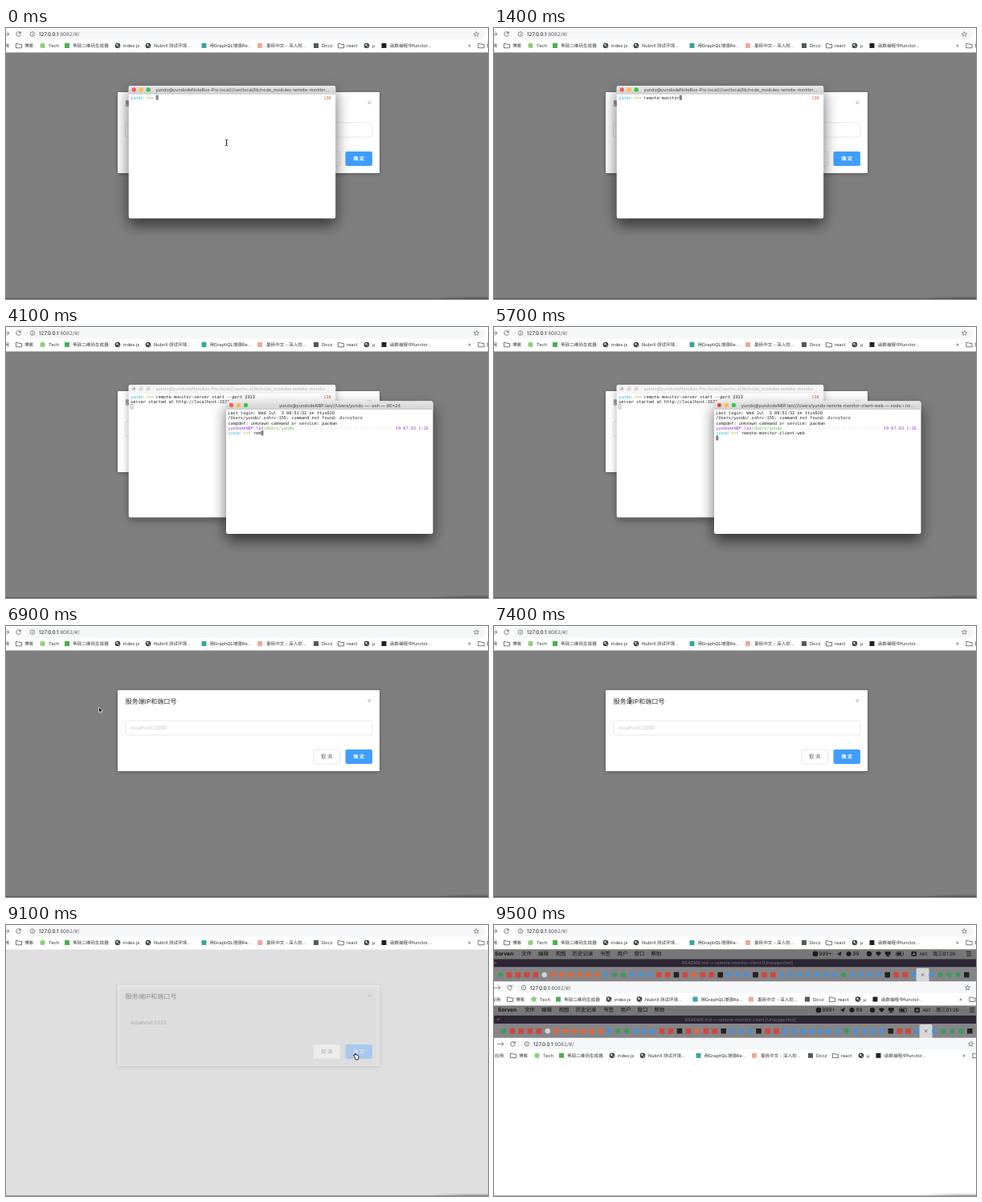
These frames come from a looping animation (600 px wide and 338 px high, 9600 ms). An HTML page with a canvas:

```html
<!DOCTYPE html>
<html lang="zh-CN">
<head>
<meta charset="utf-8">
<title>Remote monitor demo</title>
<style>
html, body { margin: 0; width: 100%; height: 100%; overflow: hidden; background: #fff; }
canvas { display: block; width: 600px; height: 338px; }
</style>
</head>
<body>
<canvas id="stage" width="600" height="338"></canvas>
<script>
const c = document.getElementById('stage').getContext('2d');
c.textRendering = 'geometricPrecision';
const LOOP = 9600, STEP = 100;
const SANS = 'Inter, "Noto Sans CJK SC", "Noto Sans CJK", sans-serif';
const MONO = '"DejaVu Sans Mono", monospace';
const MONO_SIZE = 5.25, CELL = 3.16, LINE = 6.25;
const clamp = v => Math.max(0, Math.min(1, v));
const easeOut = v => 1 - (1 - clamp(v)) ** 2;

// y is the middle of the capitals
function text(s, x, y, size, color = '#333', { align = 'left', font = SANS, weight = 400 } = {}) {
  c.font = `${weight} ${size}px ${font}`;
  c.textAlign = align;
  c.fillStyle = color;
  c.fillText(s, x, y + size * 0.36);
}
function box(x, y, w, h, fill, r = 0, stroke) {
  c.beginPath();
  c.roundRect(x, y, w, h, r);
  paint(fill, stroke);
}
function dot(x, y, r, fill, stroke) {
  c.beginPath();
  c.arc(x, y, r, 0, 7);
  paint(fill, stroke);
}
function paint(fill, stroke) {
  if (fill) { c.fillStyle = fill; c.fill(); }
  if (stroke) { c.strokeStyle = stroke; c.stroke(); }
}
function shape(d, x, y, fill, stroke, width = 0.7) {
  c.save();
  c.translate(x, y);
  c.lineWidth = width;
  const p = new Path2D(d);
  if (fill) { c.fillStyle = fill; c.fill(p); }
  if (stroke) { c.strokeStyle = stroke; c.stroke(p); }
  c.restore();
}
function shadow(dy, blur, alpha, draw) {
  c.save();
  c.shadowOffsetY = dy;
  c.shadowBlur = blur;
  c.shadowColor = `rgba(0,0,0,${alpha})`;
  draw();
  c.restore();
}

// Browser toolbar
const icons = {
  folder: x => shape('M-3.6-2.6h2.6l.8 1h3.8v4.4h-7.2z', x, 22, null, '#5f6368', 0.9),
  globe: x => {
    dot(x, 22, 3.3, '#3c4043');
    shape('M-2-1.2L.2-2 .4-.2-.8.8zM.6.8l1.6-.4-1 1.8z', x, 22, '#fff');
  },
};
const bookmarks = [
  [16, 'folder', 23, '博客'], [45.5, '#8fd07a', 53, 'Tech'],
  [76, '#4caf50', 83, '苇砚二维码生成器', true], [139, 'globe', 146, 'index.js'],
  [177, 'globe', 184, 'Nubrill 测试环境...'], [246.5, '#35a6a0', 253.5, '用GraphQL增强Re...', true],
  [316, '#f2a899', 324, '墨砾中文 - 深入挖...', true], [386, '#55585c', 393, 'Docz', true],
  [417, 'folder', 424, 'react'], [449, 'globe', 456, 'μ'],
  [470.5, '#222', 478, '函数编程中functor...', true], [591.5, 'folder', 598, '其他'],
];
function toolbar(dx, dy) {
  c.save();
  c.translate(0, dy);
  box(0, 0, 600, 30.5, '#fff');
  c.translate(dx, 0);
  box(25, 0.8, 572, 13.6, '#f5f6f7', 6.8);
  shape('M-4 0H4M1.2-2.8L4 0 1.2 2.8', 0, 7.6, null, '#777', 0.9);
  shape('M2.4-1.6A2.8 2.8 0 1 0 2.8.6M2.8-3.2V-1H.6', 15.5, 7.6, null, '#5f6368', 0.9);
  dot(33, 7.6, 2.8, null, '#5f6368');
  shape('M0-.4V1.6M0-1.7v.7', 33, 7.6, null, '#5f6368', 0.8);
  text('127.0.0.1', 41, 7.6, 6.4, '#222');
  text(':8082/#/', 41 + c.measureText('127.0.0.1').width, 7.6, 6.4, '#666');
  shape('M0-3l.9 2 2.1.2-1.6 1.4.5 2.1L0 1.6l-1.9 1.1.5-2.1L-3-.8l2.1-.2z', 585.5, 7.6, null, '#5f6368', 0.7);
  text('应用', -7, 22, 5.6);
  for (const [ix, icon, tx, label, square] of bookmarks) {
    if (icons[icon]) icons[icon](ix);
    else if (square) box(ix - 3, 19, 6, 6, icon);
    else dot(ix, 22, 3.2, icon);
    text(label, tx, 22, 5.6);
  }
  text('»', 575, 21.6, 6.4, '#444');
  c.restore();
}

// Dialog
function dialog(t) {
  const gone = easeOut((t - 9000) / 300);
  c.fillStyle = `rgba(0,0,0,${0.5 * (1 - easeOut((t - 9000) / 200))})`;
  c.fillRect(0, 30.5, 600, 308);
  if (gone === 1) return;
  c.save();
  c.globalAlpha = 1 - gone;
  c.translate(0, -9 * gone);
  shadow(1, 5, 0.3, () => box(139, 80, 326, 101, '#fff', 1));
  text('服务端IP和端口号', 148.5, 94, 8.1, '#303133');
  shape('M-2-2L2 2M2-2L-2 2', 452.4, 93, null, '#909399', 0.7);
  const focused = t >= 7700 && t < 8900;
  box(148.5, 118, 307.5, 18, null, 2, focused ? '#409eff' : '#dcdfe6');
  const typed = 'localhost:3333'.slice(0, Math.round(14 * clamp((t - 7900) / 600)));
  text(typed || 'localhost:3000', 155.3, 127, 6.3, typed ? '#606266' : '#c0c4cc');
  if (focused && t % 1000 < 500) {
    const end = typed ? c.measureText(typed).width : 0;
    box(155.3 + end, 123.5, 0.6, 7, '#333');
  }
  const button = { align: 'center', weight: 500 };
  box(382.5, 154.3, 33.3, 17.7, '#fff', 2, '#dcdfe6');
  text('取 消', 399.2, 163, 6.1, '#505256', button);
  box(422.5, 154, 33.5, 18, t >= 8800 ? '#66b1ff' : '#409eff', 2);
  text('确 定', 439.3, 163, 6.1, '#fff', { ...button, weight: 700 });
  c.restore();
}

// Terminals
const prompt = cmd => [['yundo ', '#35b5d5'], ['>', '#c4ae38'], ['>', '#a9b02c'], ['> ', '#6fae2e'], [cmd, '#222']];
const plain = s => [[s, '#222']];

function terminal({ x, y, title, active, busy, lines, status }) {
  const w = 257.5, h = 165.5;
  shadow(active ? 8 : 4, active ? 18 : 10, active ? 0.6 : 0.35, () => box(x, y, w, h, '#fff', 2.5));
  const bar = c.createLinearGradient(0, y, 0, y + 10.5);
  bar.addColorStop(0, active ? '#e8e6e8' : '#f6f6f6');
  bar.addColorStop(1, active ? '#d2d0d2' : '#f4f4f4');
  box(x, y, w, 10.5, bar, [2.5, 2.5, 0, 0]);
  box(x, y + 10.2, w, 0.4, active ? '#b5b3b5' : '#dcdcdc');
  ['#fc5b57', '#fdbc40', '#34c84a'].forEach((color, i) =>
    dot(x + 6.5 + 9 * i, y + 5, 2.7, active ? color : '#d8d8d8'));
  if (busy) dot(x + 6.5, y + 5, 0.9, active ? '#7d1512' : '#999');
  text(title, x + 141.5, y + 5.2, 5.54, active ? '#444' : '#b0b0b0', { align: 'center' });

  let col = 0;
  lines.forEach((spans, row) => {
    col = 0;
    for (const [s, color] of spans) {
      text(s, x + 2.3 + col * CELL, y + 14.7 + row * LINE, MONO_SIZE, color, { font: MONO });
      col += s.length;
    }
  });
  if (status) text(status, x + 242.6, y + 14.7, MONO_SIZE, '#c0603c', { font: MONO });
  const cx = x + 2.3 + col * CELL, cy = y + 11.7 + (lines.length - 1) * LINE;
  if (active) box(cx, cy, 3.1, 6, '#7f7f7f');
  else box(cx + 0.3, cy + 0.3, 2.6, 5.4, null, 0, '#888');
}

const type = (s, t, from, to) => s.slice(0, Math.round(s.length * clamp((t - from) / (to - from))));

function serverTerminal(t) {
  const lines = [prompt(type('remote-monitor-server start --port 3333', t, 900, 2300))];
  if (t >= 2700) lines.push(plain('server started at http://localhost:3333'));
  if (t >= 2500) lines.push(plain(''));
  terminal({
    x: 152.7, y: 72, lines, status: '130', active: t < 3400, busy: t >= 2500,
    title: 'yundo@yundodeNoteBox-Pro.local///usr/local/lib/node_modules remote-monitor...',
  });
}

function clientTerminal(t) {
  const running = t >= 5300;
  const lines = [plain('Last login: Wed Jul  3 00:51:52 on ttys020')];
  if (t >= 3600) {
    lines.push(plain('/Users/yundo/.zshrc:155: command not found: dircolors'),
      plain('compdef: unknown command or service: pacman'));
  }
  if (t >= 3800) {
    lines.push([['yundodeNBP.lan', '#9b3fc4'], ['/Users/yundo', '#4fb848'],
      ['  ' + '- '.repeat(19), '#b9a9c4'], ['19-07-03 1:26', '#9b3fc4']],
      prompt(type('remote-monitor-client-web', t, 4000, 5000)));
  } else lines.push(plain(''));
  if (running) lines.push(plain(''));
  terminal({
    x: 274, y: 92.5, lines, active: true, busy: running,
    title: 'yundo@yundodeNBP.lan///Users/yundo ' + (running ? 'remote-monitor-client-web — node ‹ no...' : '— -zsh — 80×24'),
  });
}

// Pointer: time, x, y, kind until the next stop
const stops = [
  [0, 274.5, 143, 'beam'], [300, 274.5, 143, 'beam'], [900, 271, 166, ''],
  [5800, 275, 172, 'beam'], [6300, 115.5, 101, 'arrow'], [7000, 115.5, 101, 'arrow'],
  [7300, 160, 95, 'beam'], [7400, 169, 93, 'beam'], [7700, 190, 127, 'beam'],
  [7900, 190, 127, ''], [8500, 190, 130, 'beam'], [8600, 300, 145, 'arrow'],
  [8900, 435.5, 161, 'hand'], [9200, 435.5, 161, 'arrow'], [9500, 435.5, 161, ''], [9600, 435.5, 161, ''],
];
const pointers = {
  beam: (x, y) => {
    const d = 'M-1.4-3.6Q0-3.6 0-2.6Q0-3.6 1.4-3.6M0-2.8V2.8M-1.4 3.6Q0 3.6 0 2.6Q0 3.6 1.4 3.6M-.8.8H.8';
    shape(d, x, y, null, 'rgba(255,255,255,.7)', 1.6);
    shape(d, x, y, null, '#111', 0.9);
  },
  arrow: (x, y) => shape('M0 0V7L1.6 5.5 2.7 8 4 7.4 2.9 5H5Z', x, y, '#111', '#fff'),
  hand: (x, y) => shape('M-1 4L-3 1.2Q-3 .2-1.2 1.4V-.4Q-.5-1.4.2-.4V1L3 1.6Q3.6 2 3.4 4L2.8 7H-.2Z', x, y, '#fff', '#222', 0.9),
};
function pointer(t) {
  const i = stops.findIndex((s, n) => n + 1 < stops.length && t < stops[n + 1][0]);
  const [t0, x0, y0, kind] = stops[i], [t1, x1, y1] = stops[i + 1];
  const k = (t - t0) / (t1 - t0);
  if (kind) pointers[kind](x0 + (x1 - x0) * k, y0 + (y1 - y0) * k);
}

// Repeated desktop strips at the end of the loop
const tints = { g: '#3c9a5f', r: '#d2453c', w: '#d5d5d8', o: '#e2673a', b: '#4f8fd0', k: '#222' };
const tabs = 'grrrrwoooooobggbbbrrkrorrkbbbkrrbbbbbbbgbbbbkrrb_bgggk';
const menu = [[34, '文件'], [55, '编辑'], [76.5, '视图'], [97.5, '历史记录'],
  [132, '书签'], [153.5, '用户'], [174.5, '窗口'], [195.5, '帮助']];
function desktopStrip(dx, y) {
  box(0, y, 600, 12, '#777');
  box(0, y + 12, 600, 10.5, '#2c2534');
  box(0, y + 22.5, 600, 18, '#858588');
  c.save();
  c.translate(dx, y);
  text('Sorven', 1, 5.6, 6.6, '#111', { weight: 700 });
  for (const [x, label] of menu) text(label, x, 5.6, 6.5, '#111');
  dot(400, 5.6, 3.4, '#1c1c1c');
  text('999+', 404.5, 5.6, 6.4, '#111');
  shape('M-3 0L3-3 1 3-.6 1z', 430, 5.6, '#1c1c1c');
  dot(441.5, 5.6, 3, '#1c1c1c');
  text('99', 446.5, 5.6, 6.4, '#111');
  dot(467, 5.6, 3.2, '#1c1c1c');
  shape('M-3.6-1.2Q0-4 3.6-1.2L0 3z', 478.5, 5.6, '#1c1c1c');
  shape('M-3 1V-2.5H3.5V1M-2 3L.2.6 2.4 3z', 490, 5.6, '#1c1c1c', '#1c1c1c', 0.5);
  box(500.5, 3.4, 9, 4.6, null, 1, '#1c1c1c');
  box(501.5, 4.3, 5.5, 2.8, '#1c1c1c');
  box(519.5, 2.6, 6.4, 6.2, '#1c1c1c', 1);
  text('A', 522.7, 5.7, 5, '#ddd', { align: 'center' });
  text('ABC', 529.5, 5.6, 5, '#111');
  text('周三01:26', 546, 5.6, 6.3, '#111');
  shape('M-3-2.4H3M-3 0H3M-3 2.4H3', 591, 5.6, null, '#1c1c1c', 0.9);
  dot(1.5, 17.2, 1.8, '#7a3f42');
  text('README.md — remote-monitor-client [Unsupported]', 303, 17.2, 5.5, '#77717d', { align: 'center' });
  [...tabs].forEach((key, i) => {
    const x = 8 + i * 10.95;
    if (key === '_') {
      box(x - 8, 23.5, 16, 17, '#d6d7da', [2, 2, 0, 0]);
      shape('M-1.6-1.6L1.6 1.6M1.6-1.6L-1.6 1.6', x, 31.8, null, '#444');
    } else if ('rk'.includes(key)) box(x - 3.3, 28.5, 6.6, 6.6, tints[key], 0.6);
    else dot(x, 31.8, 3.2, tints[key]);
  });
  c.restore();
  toolbar(dx + 4, y + 40.3);
}

function draw(t) {
  c.lineWidth = 0.7;
  c.fillStyle = '#fff';
  c.fillRect(0, 0, 600, 338);
  toolbar(0, 0);
  if (t < 9300) dialog(t);
  if (t < 6400) serverTerminal(t);
  if (t >= 3400 && t < 6400) clientTerminal(t);
  if (t >= 9500) {
    desktopStrip(0, 30.3);
    desktopStrip(4, 100.5);
  }
  c.fillStyle = 'rgba(0,0,0,.3)';
  c.fillRect(0, 337, 600, 1);
  const corner = c.createLinearGradient(530, 0, 575, 0);
  corner.addColorStop(0, 'rgba(0,0,0,0)');
  corner.addColorStop(1, 'rgba(0,0,0,.15)');
  c.fillStyle = corner;
  c.fillRect(530, 335, 70, 3);
  pointer(t);
}

function tick() {
  draw(Math.floor((performance.now() % LOOP) / STEP) * STEP);
  requestAnimationFrame(tick);
}
tick();
</script>
</body>
</html>
```
